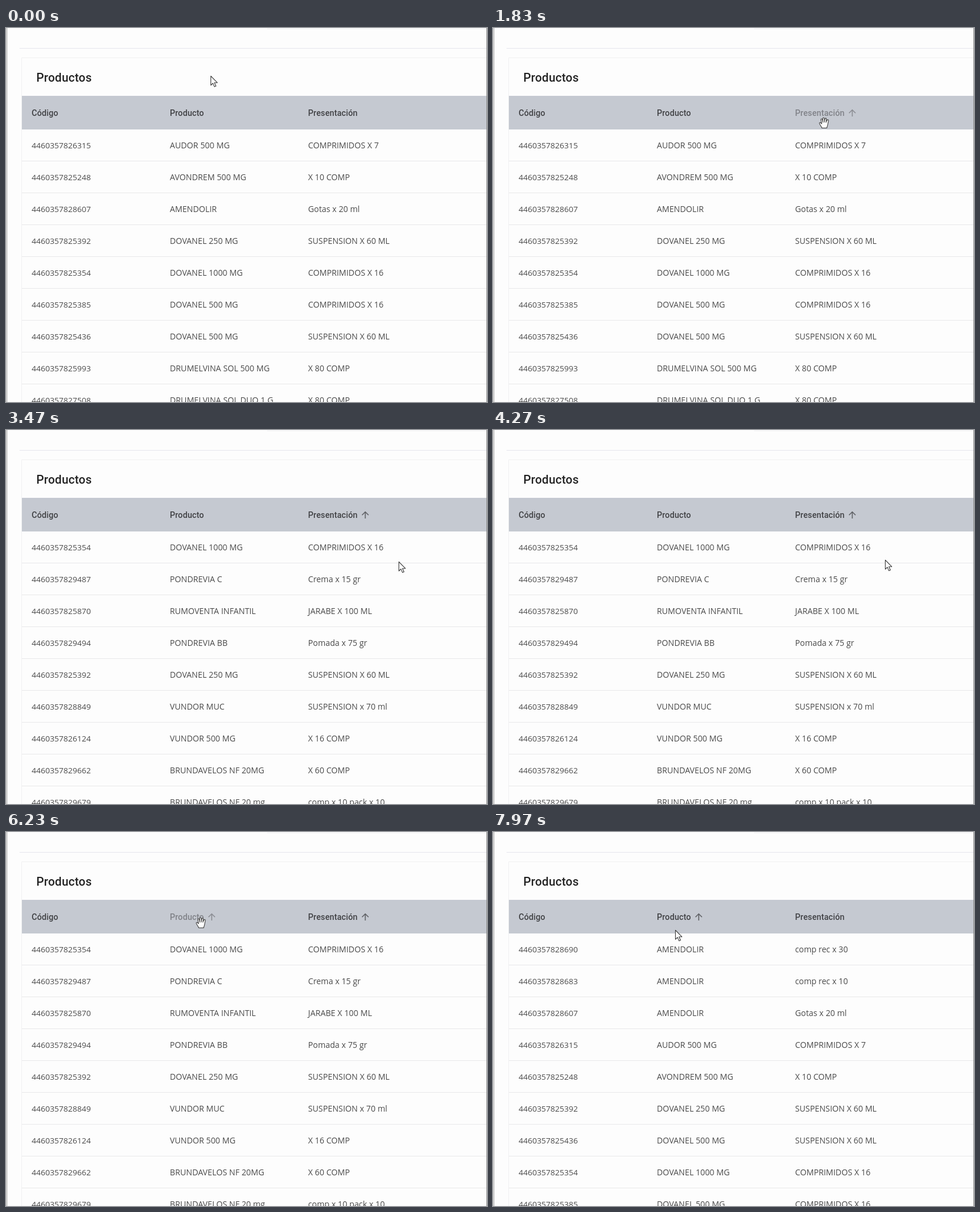
Write an HTML page that moves like this. It is 816 by 634 pixels and loops after 8 s.

```html
<!DOCTYPE html>
<html lang="es">
<head>
<meta charset="utf-8">
<title>Productos</title>
<style>
  html, body { margin: 0; width: 100%; height: 100%; overflow: hidden; background: #fdfdfd; }
  svg { display: block; width: 816px; height: 634px; }
  .title, .head { font-family: Roboto, sans-serif; font-weight: 500; }
  .title { font-size: 20px; letter-spacing: .0125em; fill: #222; }
  .head { font-size: 14px; letter-spacing: .0071em; fill: #404144; }
  .head path { fill: none; stroke: #606266; stroke-width: 1.6; }
  .head.hover { fill: #808288; }
  .head.hover path { stroke: #8c8e94; }
  .row { font: 13.8px "Open Sans", sans-serif; fill: #4a4a4a; }
  .row .code { font-size: 13.5px; }
  .cursor path { fill: #fdfdfd; stroke: #3c3c3c; stroke-width: 1.1; stroke-linejoin: round; }
</style>
</head>
<body>
<svg id="stage" viewBox="0 0 816 634">
  <rect width="816" height="634" fill="#fdfdfd"/>
  <path d="M443 1.5H816" stroke="#f0f0f2"/>
  <path d="M23 34.5H816" stroke="#e6e6ee"/>
  <path d="M26.5 634V50.5H816" fill="none" stroke="#f1f1f2"/>
  <path d="M1.5 0V634" stroke="#969696"/>
  <rect x="27" y="115" width="789" height="57" fill="#c5c9d1"/>
  <text class="title" x="51.5" y="91">Productos</text>
</svg>
<script>
const LOOP = 8000;
const COLUMNS = [43.5, 278, 512.5];
const HEADS = [["Código", 45], ["Producto", 58], ["Presentación", 84]];
const PREFIX = "4460357";
const CATALOG = [
  ["826315", "AUDOR 500 MG", "COMPRIMIDOS X 7"],
  ["825248", "AVONDREM 500 MG", "X 10 COMP"],
  ["828607", "AMENDOLIR", "Gotas x 20 ml"],
  ["825392", "DOVANEL 250 MG", "SUSPENSION X 60 ML"],
  ["825354", "DOVANEL 1000 MG", "COMPRIMIDOS X 16"],
  ["825385", "DOVANEL 500 MG", "COMPRIMIDOS X 16"],
  ["825436", "DOVANEL 500 MG", "SUSPENSION X 60 ML"],
  ["825993", "DRUMELVINA SOL 500 MG", "X 80 COMP"],
  ["827508", "DRUMELVINA SOL DUO 1 G", "X 80 COMP"],
  ["829487", "PONDREVIA C", "Crema x 15 gr"],
  ["825870", "RUMOVENTA INFANTIL", "JARABE X 100 ML"],
  ["829494", "PONDREVIA BB", "Pomada x 75 gr"],
  ["828849", "VUNDOR MUC", "SUSPENSION x 70 ml"],
  ["826124", "VUNDOR 500 MG", "X 16 COMP"],
  ["829662", "BRUNDAVELOS NF 20MG", "X 60 COMP"],
  ["829679", "BRUNDAVELOS NF 20 mg", "comp x 10 pack x 10"],
  ["828690", "AMENDOLIR", "comp rec x 30"],
  ["828683", "AMENDOLIR", "comp rec x 10"]
];
// Start time, sorted column, row order
const SORTS = [
  [0, -1, [0, 1, 2, 3, 4, 5, 6, 7, 8]],
  [1900, 2, [4, 9, 10, 11, 3, 12, 13, 14, 15]],
  [6950, 1, [16, 17, 2, 0, 1, 3, 6, 4, 5]]
];
// Time, x, y of the pointer tip
const PATH = [
  [0, 347, 81], [150, 347, 81], [1000, 559, 152], [2150, 559, 152],
  [2500, 557, 163], [2700, 557, 163], [3400, 666, 223], [4200, 666, 223],
  [5000, 643, 97], [5200, 643, 97], [6100, 328, 145], [7250, 328, 145],
  [7650, 309, 166], [LOOP, 309, 166]
];

const stage = document.getElementById("stage");

function add(parent, tag, attrs = {}, text = "") {
  const node = document.createElementNS(parent.namespaceURI, tag);
  for (const [key, value] of Object.entries(attrs)) node.setAttribute(key, value);
  node.textContent = text;
  return parent.appendChild(node);
}

const show = (node, on) => node.setAttribute("visibility", on ? "visible" : "hidden");

const heads = HEADS.map(([label, width], i) => {
  const group = add(stage, "g", { class: "head" });
  add(group, "text", { x: COLUMNS[i], y: 149 }, label);
  const arrow = add(group, "path", {
    d: "M0 12V1M-5.5 6.3L0 .8L5.5 6.3",
    transform: `translate(${COLUMNS[i] + width + 13} 138)`
  });
  return { group, arrow, left: COLUMNS[i], right: COLUMNS[i] + width + 20 };
});

for (let y = 225.5; y < 634; y += 54) {
  add(stage, "path", { d: `M27 ${y}H816`, stroke: "#e9e9ea" });
}

const tables = SORTS.map(([, , order]) => {
  const table = add(stage, "g", { class: "row" });
  order.forEach((index, r) => {
    const [code, name, form] = CATALOG[index];
    [PREFIX + code, name, form].forEach((text, c) =>
      add(table, "text", { x: COLUMNS[c], y: 204.4 + 54 * r, class: c ? "" : "code" }, text));
  });
  return table;
});

add(stage, "path", { d: "M815.5 0V634", stroke: "#8c8c8c" });

const cursor = add(stage, "g", { class: "cursor" });
const pointer = add(cursor, "path", {
  d: "M.5 .5V16L4 12.6L6.6 18.6L9.2 17.5L6.6 11.7H11.5Z"
});
const hand = add(cursor, "g", { transform: "translate(-6 -1)" });
add(hand, "path", {
  d: "M5 18.5C4 15.5 1 12.5 .8 10.5C.7 9 2.3 8.7 3.5 10.2L4.7 11.5L3.4 4.7C3.1 2.8 5.2 2.4 5.7 4.2" +
     "L6.6 7.5L6.5 2.5C6.5 .4 9 .4 9.1 2.5L9.4 7.2L10.2 3C10.6 1.2 12.8 1.6 12.6 3.5L12.2 8" +
     "L13.7 5.3C14.6 3.7 16.6 4.6 16 6.5L14.9 12.5C14.7 14.8 13.8 16 13.2 18.5Z"
});
add(hand, "path", { d: "M6.6 7.5L7 9.3M9.4 7.2V9M12.2 8L11.9 9.3" });

function pointerAt(time) {
  const next = PATH.findIndex(([t]) => t > time);
  const [t0, x0, y0] = PATH[next - 1];
  const [t1, x1, y1] = PATH[next];
  const u = (time - t0) / (t1 - t0);
  const eased = u * u * (3 - 2 * u);
  return [x0 + (x1 - x0) * eased, y0 + (y1 - y0) * eased];
}

function draw(time) {
  const [x, y] = pointerAt(time);
  const current = SORTS.filter(([start]) => start <= time).length - 1;
  const sorted = SORTS[current][1];
  let over = false;

  heads.forEach(({ group, arrow, left, right }, i) => {
    const hover = x >= left && x <= right && y >= 126 && y <= 158;
    over = over || hover;
    group.classList.toggle("hover", hover);
    show(arrow, hover || i === sorted);
  });
  tables.forEach((table, i) => show(table, i === current));
  show(hand, over);
  show(pointer, !over);
  cursor.setAttribute("transform", `translate(${Math.round(x)} ${Math.round(y)})`);
}

const begin = performance.now();
function tick(now) {
  draw(Math.max(0, now - begin) % LOOP);
  requestAnimationFrame(tick);
}
draw(0);
requestAnimationFrame(tick);
</script>
</body>
</html>
```
